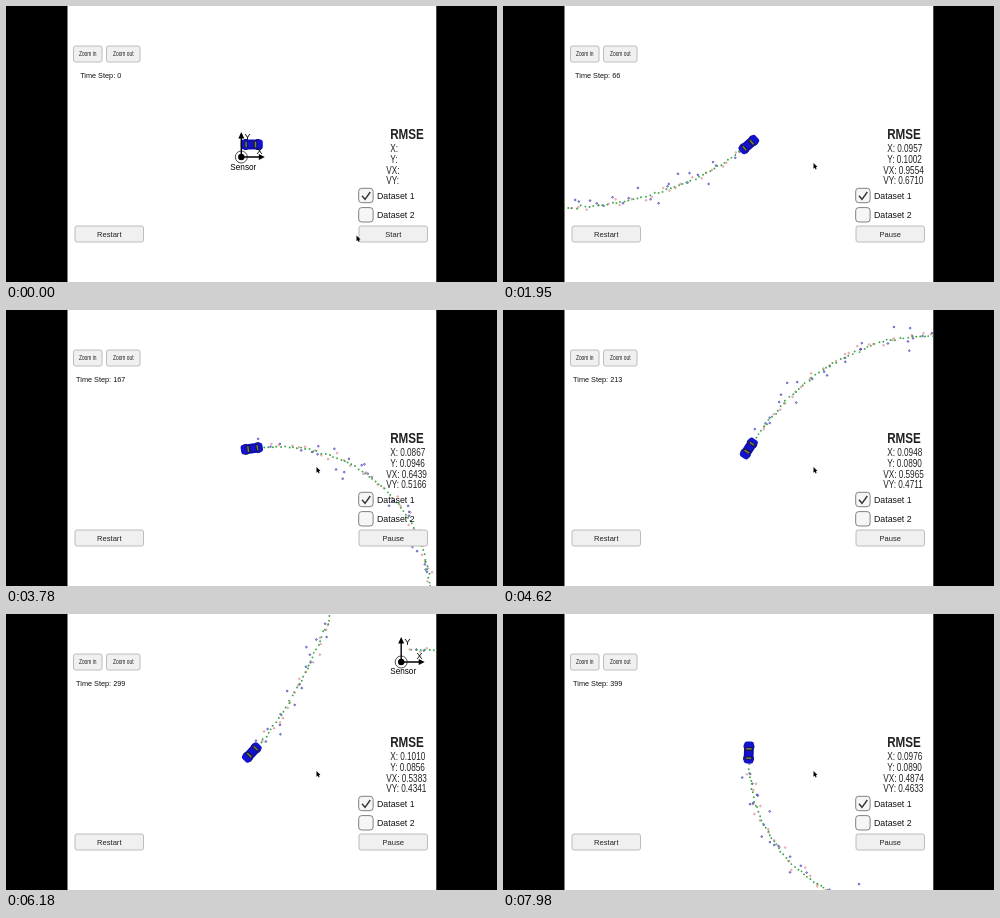
An HTML page with a canvas that plays this animation: 491 px wide and 276 px high, repeating every 8000 ms.

```html
<!DOCTYPE html>
<html>
<head>
<meta charset="utf-8">
<style>
  html, body { margin: 0; height: 100%; overflow: hidden; background: #000; }
  canvas { display: block; width: 491px; height: 276px; }
</style>
</head>
<body>
<canvas id="stage"></canvas>
<script>
const W = 491, H = 276, LOOP = 8000, START = 770;
const VIEW = { x: 61.5, w: 368.8 };
const CAR = { x: 245.8, y: 138.5 };
const METRE = 17, SPEED = 4.45, STEPS = 400;
const FONT = '"Liberation Sans", Arial, sans-serif';
const TAU = Math.PI * 2;

const canvas = document.getElementById('stage');
const ratio = window.devicePixelRatio || 1;
canvas.width = W * ratio;
canvas.height = H * ratio;
const ctx = canvas.getContext('2d');

// time, step, then the four error values
const KEYS = [
  [770, 0, 0, 0, 0, 0],
  [806, 2, 0.1, 0.1, 5.0, 1.5],
  [1350, 32, 0.1137, 0.0880, 1.3290, 0.8070],
  [2550, 99, 0.0893, 0.1037, 0.8031, 0.6222],
  [3780, 167, 0.0867, 0.0946, 0.6439, 0.5166],
  [5430, 257, 0.0995, 0.0853, 0.5650, 0.4405],
  [6930, 341, 0.1022, 0.0858, 0.5173, 0.4293],
  [7980, 399, 0.0976, 0.0890, 0.4874, 0.4633]
];

const clamp = v => Math.max(0, Math.min(1, v));
const lerp = (a, b, k) => a + (b - a) * k;
const ease = k => k * k * (3 - 2 * k);

let seed = 7;
function random() {
  seed = (seed * 16807) % 2147483647;
  return seed / 2147483647;
}
const gauss = () => Math.sqrt(-2 * Math.log(random())) * Math.cos(TAU * random());

// The heading swings 250.5 degrees left and back over 500 steps;
// the car slows a little where it turns hardest.
const phase = s => TAU * s / 500;
const yaw = s => 250.5 * Math.PI / 360 * (1 - Math.cos(phase(s)));
const speed = s => SPEED * (1 - 0.085 * Math.sin(phase(s)) ** 2);

// Positions relative to the sensor, y pointing up.
const track = [];
for (let i = 0, x = 10.5, y = 12.5; i < STEPS; i++) {
  const range = Math.hypot(x, y), bearing = Math.atan2(y, x);
  const radar = i % 2 === 1;
  const r = range + gauss() * 0.3 * METRE, a = bearing + gauss() * 0.03;
  track.push({
    x, y, radar,
    seen: radar ? [r * Math.cos(a), r * Math.sin(a)]
                : [x + gauss() * 0.15 * METRE, y + gauss() * 0.15 * METRE],
    estimate: [x + gauss() * 0.6, y + gauss() * 0.6]
  });
  x += speed(i + 0.5) * Math.cos(yaw(i + 0.5));
  y += speed(i + 0.5) * Math.sin(yaw(i + 0.5));
}

function stateAt(t) {
  if (t < START) return { step: 0, errors: null };
  let i = 0;
  while (i < KEYS.length - 2 && t >= KEYS[i + 1][0]) i++;
  const a = KEYS[i], b = KEYS[i + 1];
  const step = Math.min(STEPS - 1, Math.round(lerp(a[1], b[1], (t - a[0]) / (b[0] - a[0]))));
  const k = (step - a[1]) / (b[1] - a[1]);
  // Squared error sums grow evenly between the keys.
  const errors = [2, 3, 4, 5].map(c =>
    Math.sqrt(Math.max(0, lerp(a[c] ** 2 * a[1], b[c] ** 2 * b[1], k)) / Math.max(1, step)));
  return { step, errors };
}

function text(str, x, y, size, { align = 'left', weight = '', narrow = 1, color = '#222' } = {}) {
  ctx.save();
  ctx.translate(x, y);
  ctx.scale(narrow, 1);
  ctx.font = `${weight} ${size}px ${FONT}`;
  ctx.textAlign = align;
  ctx.fillStyle = color;
  ctx.fillText(str, 0, 0);
  ctx.restore();
}

function box(x, y, w, h, radius, fill, stroke) {
  ctx.beginPath();
  ctx.roundRect(x, y, w, h, radius);
  ctx.fillStyle = fill;
  ctx.fill();
  if (!stroke) return;
  ctx.strokeStyle = stroke;
  ctx.lineWidth = 1;
  ctx.stroke();
}

function shape(points, fill) {
  ctx.beginPath();
  points.forEach(p => ctx.lineTo(...p));
  ctx.closePath();
  ctx.fillStyle = fill;
  ctx.fill();
}

function disc(x, y, r, color, hollow) {
  ctx.beginPath();
  ctx.arc(x, y, r, 0, TAU);
  ctx.fillStyle = ctx.strokeStyle = color;
  hollow ? ctx.stroke() : ctx.fill();
}

function button(label, x, y, w, h, size, narrow) {
  box(x, y, w, h, 2, '#f0f0f0', '#bcbcbc');
  text(label, x + w / 2, y + h / 2 + size * 0.36, size, { align: 'center', narrow });
}

function checkbox(label, y, checked) {
  box(352.7, y, 14.4, 14.4, 3, '#f6f6f6', '#808080');
  text(label, 371, y + 10.4, 8.8, { color: '#111' });
  if (!checked) return;
  ctx.beginPath();
  ctx.moveTo(356, y + 7.5);
  ctx.lineTo(359, y + 11);
  ctx.lineTo(364.3, y + 3.7);
  ctx.strokeStyle = '#333';
  ctx.lineWidth = 1.4;
  ctx.stroke();
}

function drawSensor(x, y) {
  ctx.strokeStyle = '#000';
  ctx.lineWidth = 1.4;
  ctx.beginPath();
  ctx.moveTo(x, y - 20);
  ctx.lineTo(x, y);
  ctx.lineTo(x + 19, y);
  ctx.stroke();
  shape([[x, y - 25], [x - 3, y - 18.5], [x + 3, y - 18.5]], '#000');
  shape([[x + 23.5, y], [x + 17.5, y - 3], [x + 17.5, y + 3]], '#000');
  ctx.lineWidth = 0.8;
  disc(x, y, 6, '#222', true);
  disc(x, y, 3.2, '#000');
  text('Y', x + 3.2, y - 17, 9, { color: '#000' });
  text('X', x + 15.2, y - 3, 9, { color: '#000' });
  text('Sensor', x + 2, y + 12.5, 8.2, { align: 'center', color: '#000' });
}

function drawTrail(step, ox, oy) {
  ctx.lineWidth = 0.9;
  for (const { seen, radar } of track.slice(0, step)) {
    disc(ox + seen[0], oy - seen[1], 0.8, radar ? '#4040b8' : '#e08c92', true);
  }
  for (const { estimate } of track.slice(0, Math.max(0, step - 1))) {
    disc(ox + estimate[0], oy - estimate[1], 0.95, '#3aa444');
  }
}

function drawCar(angle) {
  ctx.save();
  ctx.translate(CAR.x, CAR.y);
  ctx.rotate(-angle);
  for (const x of [-8, 4]) box(x, -5.4, 4, 10.8, 1, '#111');
  box(-11, -4.9, 22, 9.8, 3, '#1212cf');
  box(-7, -3.6, 3, 7.2, 1, '#15153c');
  box(1.5, -3.9, 3.6, 7.8, 1, '#15153c');
  ctx.fillStyle = '#7d8140';
  ctx.fillRect(-6.4, -2.6, 1.4, 5.2);
  ctx.fillRect(2.9, -2.8, 1.5, 5.6);
  ctx.fillStyle = '#0c0c88';
  ctx.fillRect(-3.8, -4, 5, 0.9);
  ctx.fillRect(-3.8, 3.1, 5, 0.9);
  ctx.restore();
}

function drawPanel(step, errors) {
  button('Zoom in', 67.5, 40, 28.5, 16, 6.8, 0.72);
  button('Zoom out', 100.5, 40, 33.5, 16, 6.8, 0.72);
  button('Restart', 69, 220, 68.5, 16, 7.6);
  button(errors ? 'Pause' : 'Start', 353, 220, 68.5, 16, 7.6);
  text('Time Step: ' + step, 94.7, 72, 7.3, { align: 'center', color: '#111' });
  text('RMSE', 384.2, 132.9, 14.4, { weight: 'bold', narrow: 0.81 });
  ['X:', 'Y:', 'VX:', 'VY:'].forEach((label, i) => {
    const value = errors ? ' ' + errors[i].toFixed(4) : '';
    text(label + value, i < 2 ? 384.2 : 380.2, 145.7 + i * 10.9, 10, { narrow: 0.82 });
  });
  checkbox('Dataset 1', 182.3, true);
  checkbox('Dataset 2', 201.6, false);
}

function drawCursor(t) {
  const reach = ease(clamp((t - 60) / 440));
  const leave = ease(clamp((t - 840) / 360));
  const x = lerp(lerp(350.5, 370, reach), 310.5, leave);
  const y = lerp(lerp(229.5, 229, reach), 157, leave);
  const outline = [[0, 0], [0, 5.8], [1.3, 4.7], [2.2, 6.6], [3.1, 6.1], [2.3, 4.3], [4, 4.1]];
  shape(outline.map(([dx, dy]) => [x + dx, y + dy]), '#000');
}

function draw(t) {
  const { step, errors } = stateAt(t);
  const ox = CAR.x - track[step].x, oy = CAR.y + track[step].y;
  ctx.setTransform(ratio, 0, 0, ratio, 0, 0);
  ctx.fillStyle = '#000';
  ctx.fillRect(0, 0, W, H);
  ctx.save();
  ctx.beginPath();
  ctx.rect(VIEW.x, 0, VIEW.w, H);
  ctx.clip();
  ctx.fillStyle = '#fff';
  ctx.fillRect(0, 0, W, H);
  drawTrail(step, ox, oy);
  drawCar(yaw(step));
  drawSensor(ox, oy);
  drawPanel(step, errors);
  drawCursor(t);
  ctx.restore();
}

const begin = performance.now();
function frame() {
  const t = (performance.now() - begin) % LOOP;
  draw(Math.floor(t / 30) * 30);
  requestAnimationFrame(frame);
}
frame();
</script>
</body>
</html>
```
